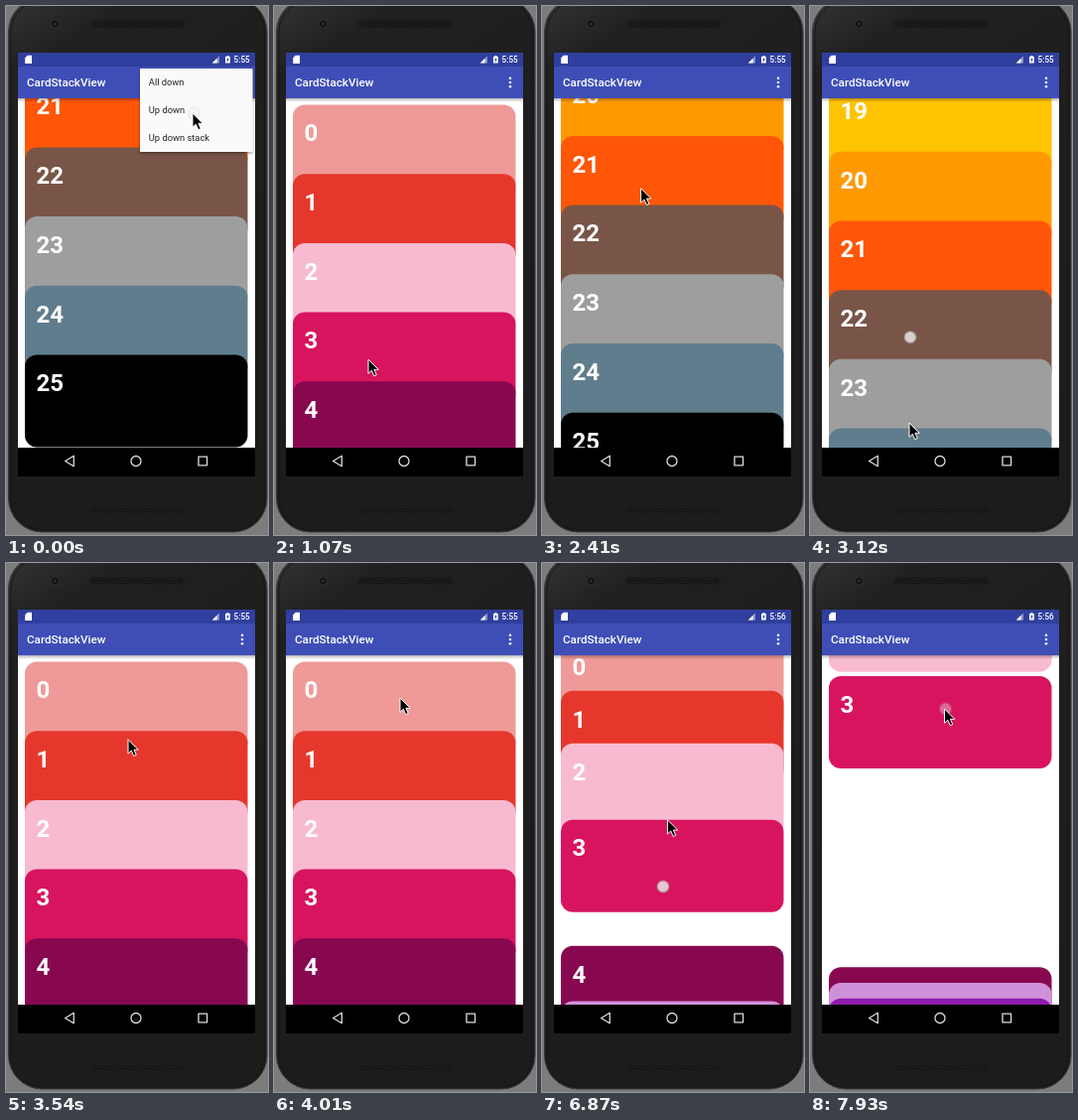
An HTML page for the animation above (7990 ms loop, 264x533 px).

```html
<!DOCTYPE html>
<html lang="en">
<head>
<meta charset="utf-8">
<title>Card stack</title>
<style>
html, body { margin: 0; width: 100%; height: 100%; overflow: hidden; background: #7c7c7c; }
svg { display: block; width: 264px; height: 533px; font-family: Roboto, "Open Sans", sans-serif; }
.num { font-size: 24px; font-weight: 700; fill: #fff; }
.item { font-size: 9.33px; fill: #222; }
</style>
</head>
<body>
<svg viewBox="0 0 264 533">
  <defs>
    <clipPath id="content"><rect x="12" y="93" width="239" height="352"/></clipPath>
    <linearGradient id="body" x2=".3" y2="1">
      <stop offset="0" stop-color="#343434"/><stop offset=".14" stop-color="#202020"/>
      <stop offset="1" stop-color="#1c1c1c"/>
    </linearGradient>
    <linearGradient id="drop" x2="0" y2="1">
      <stop offset="0" stop-color="#000" stop-opacity=".28"/><stop offset="1" stop-color="#000" stop-opacity="0"/>
    </linearGradient>
    <pattern id="mesh" width="3" height="3" patternUnits="userSpaceOnUse">
      <rect width="3" height="3" fill="#242424"/>
      <circle cx=".8" cy=".8" r=".8" fill="#080808"/><circle cx="2.3" cy="2.3" r=".8" fill="#080808"/>
    </pattern>
    <filter id="soft" x="-20%" y="-20%" width="140%" height="140%">
      <feDropShadow dx="0" dy="1.5" stdDeviation="1.8" flood-opacity=".4"/>
    </filter>
  </defs>

  <rect x="2.5" y="-8" width="260.5" height="538" rx="34" fill="url(#body)" stroke="#383838"/>
  <rect x="5" y="-5" width="255.5" height="532.5" rx="31" fill="none" stroke="#171717"/>
  <rect x="85" y="14.5" width="95" height="7" rx="3.5" fill="url(#mesh)"/>
  <rect x="85" y="505" width="95" height="7" rx="3.5" fill="url(#mesh)"/>
  <circle cx="49.5" cy="18" r="4" fill="#111" stroke="#303030"/>
  <circle cx="49.5" cy="18" r="1.5" fill="#2b2f3c"/>

  <rect x="12" y="47" width="239" height="427" fill="#fff"/>
  <g id="cards" clip-path="url(#content)"></g>

  <rect x="12" y="93" width="239" height="4" fill="url(#drop)"/>
  <rect x="12" y="47" width="239" height="14" fill="#303f9f"/>
  <rect x="12" y="61" width="239" height="32" fill="#3f4eb6"/>
  <text x="21" y="81" font-size="11.67" font-weight="500" fill="#fff">CardStackView</text>
  <g fill="#fff">
    <circle cx="238" cy="72.8" r="1.25"/><circle cx="238" cy="77" r="1.25"/><circle cx="238" cy="81.2" r="1.25"/>
    <path d="M21.6 49.8H26V58H19.2V52.2Z"/>
    <path d="M207.8 57.5L215 50.3V57.5Z" opacity=".45"/><path d="M207.8 57.5L212.6 52.7V57.5Z"/>
    <path d="M221 51H222.3V50H224.5V51H225.8V57.6H221Z"/>
    <path d="M223.8 51.8L222.2 54.7H223.2V56.6L224.7 53.8H223.8Z" fill="#303f9f"/>
    <text id="clock" x="229.6" y="57" font-size="8.17" font-weight="500"></text>
  </g>

  <rect x="12" y="445" width="239" height="29" fill="#000"/>
  <g fill="none" stroke="#ddd" stroke-width="1.3" stroke-linejoin="round">
    <path d="M68.3 453.3V463.7L59.6 458.5Z"/>
    <circle cx="131" cy="458.5" r="5"/>
    <rect x="194" y="454.2" width="8.6" height="8.6"/>
  </g>

  <g id="menu">
    <rect x="135" y="63" width="113.5" height="84" rx="1" fill="#fafafa" filter="url(#soft)"/>
    <text class="item" x="143.8" y="80">All down</text>
    <text class="item" x="143.8" y="108">Up down</text>
    <text class="item" x="143.8" y="136">Up down stack</text>
  </g>

  <circle id="touch" r="5.8" fill="#e8e6e6" fill-opacity=".85" stroke="#a39c9c" stroke-opacity=".5" stroke-width="1.8"/>
  <g id="cursor">
    <path d="M0 0V14.3L3.3 11.2L5.7 16.7L8.3 15.6L5.9 10.3H10.3Z" stroke="#fff"/>
  </g>
</svg>
<script>
const LOOP = 7990;
const TOP = 99.5, STEP = 69.7, CARD_H = 93, GAP = 11.7, BOTTOM = 444.5;
const TALL = [6, 10], EXTRA = 53; // cards with a taller header
const COLORS = ('ef9a98 e6372c f8bad0 d8145f 880850 ce91d9 8e1aae 490789 b39ddc 6633b8 301191 2196f3 03a9f4 ' +
  '00bcd4 009688 4caf50 8bc34a cddc39 ffeb3b fec301 ff9900 ff5707 795547 9e9e9e 607d8d 000000').split(' ');

const LAG = 90, PRESS = 100, DRAG = 240, FLING = 240, FOLD = 400;

// What the hand does: the cursor comes to (x, y), rests, then taps a card or swipes to height `to`.
const ACTIONS = [
  { at: -80, x: 188, y: 108 },
  { at: 130, x: 98, y: 170, to: 400, scroll: 0 },
  { at: 1080, x: 95, y: 356, to: 150, scroll: 493 },
  { at: 1880, x: 97, y: 388, to: 140, scroll: Infinity },
  { at: 2880, x: 100, y: 190, to: 420, scroll: 0, rest: 180 },
  { at: 4430, x: 127, y: 136, card: 0, fold: 1, rest: 420 },
  { at: 5590, x: 135, y: 148, card: 0, fold: -1, rest: 480 },
  { at: 6700, x: 121, y: 326, card: 3, fold: 1, rest: 230 },
  { at: 7822, x: 135.5, y: 147, card: 3, fold: -1, rest: 540 }
];
const swipes = ACTIONS.filter(a => a.to);
const taps = ACTIONS.filter(a => a.fold);
const endOf = a => a.at + (a.to ? DRAG : PRESS);

const $ = id => document.getElementById(id);
const clamp = v => Math.min(1, Math.max(0, v));
const mix = (a, b, p) => a + (b - a) * p;
const smooth = p => (1 - Math.cos(Math.PI * clamp(p))) / 2;
const out = (p, power) => 1 - (1 - clamp(p)) ** power;

function el(name, attrs, parent) {
  const node = document.createElementNS('http://www.w3.org/2000/svg', name);
  for (const k in attrs) node.setAttribute(k, attrs[k]);
  return parent.appendChild(node);
}

const move = (node, x, y) => node.setAttribute('transform', `translate(${x.toFixed(2)} ${y.toFixed(2)})`);

const cards = COLORS.map((color, i) => {
  const g = el('g', {}, $('cards'));
  const height = CARD_H + (TALL.includes(i) ? EXTRA : 0);
  el('rect', { x: 19, width: 224.5, height, rx: 12, fill: '#' + color }, g);
  el('text', { x: 30.5, y: 36.8, class: 'num' }, g).textContent = i;
  return g;
});

const restY = i => TOP + i * STEP + EXTRA * TALL.filter(n => n < i).length;
const END = restY(cards.length - 1) + CARD_H - BOTTOM;

function openY(i, sel) {
  if (i < sel) return 0;
  if (i === sel) return TOP;
  return BOTTOM - GAP * Math.max(0, 4 - (i - sel));
}

// The list follows the finger, then flings on to its goal.
function scrollAt(t) {
  return swipes.reduce((pos, s) => {
    const held = t - LAG - s.at;
    const dragged = pos + (s.y - s.to) * clamp(held / DRAG);
    return mix(dragged, Math.min(s.scroll, END), out((held - DRAG) / FLING, 1.5));
  }, END);
}

function cursorAt(t) {
  let { x, y } = ACTIONS[0], left = endOf(ACTIONS[0]);
  for (const a of ACTIONS.slice(1)) {
    if (t < left) break;
    const p = out((t - left) / (a.at - (a.rest || 0) - left), 3);
    x = mix(x, a.x, p);
    y = mix(y, a.y, p);
    if (a.to) y = mix(y, a.to, clamp((t - a.at) / DRAG));
    left = endOf(a);
  }
  return [x, y];
}

const touchAlpha = t => Math.max(...ACTIONS.map(a =>
  Math.min(clamp((t - a.at - 50) / 120), clamp((endOf(a) + LAG + 80 - t) / 80))));

function draw(t) {
  const scroll = scrollAt(t);
  const sel = (taps.findLast(a => t >= a.at) || taps[0]).card;
  const open = taps.reduce((sum, a) => sum + a.fold * smooth((t - a.at - 40) / FOLD), 0);
  cards.forEach((g, i) => move(g, 0, mix(restY(i) - scroll, openY(i, sel), open)));

  $('menu').setAttribute('opacity', 1 - clamp((t - 50) / 200));
  $('clock').textContent = t < 4700 ? '5:55' : '5:56';

  const [tx, ty] = cursorAt(t - LAG);
  $('touch').setAttribute('opacity', touchAlpha(t));
  move($('touch'), tx + 1, ty);
  move($('cursor'), ...cursorAt(t));
}

let start;
function tick(now) {
  start ??= now;
  draw((now - start) % LOOP);
  requestAnimationFrame(tick);
}
draw(0);
requestAnimationFrame(tick);
</script>
</body>
</html>
```
